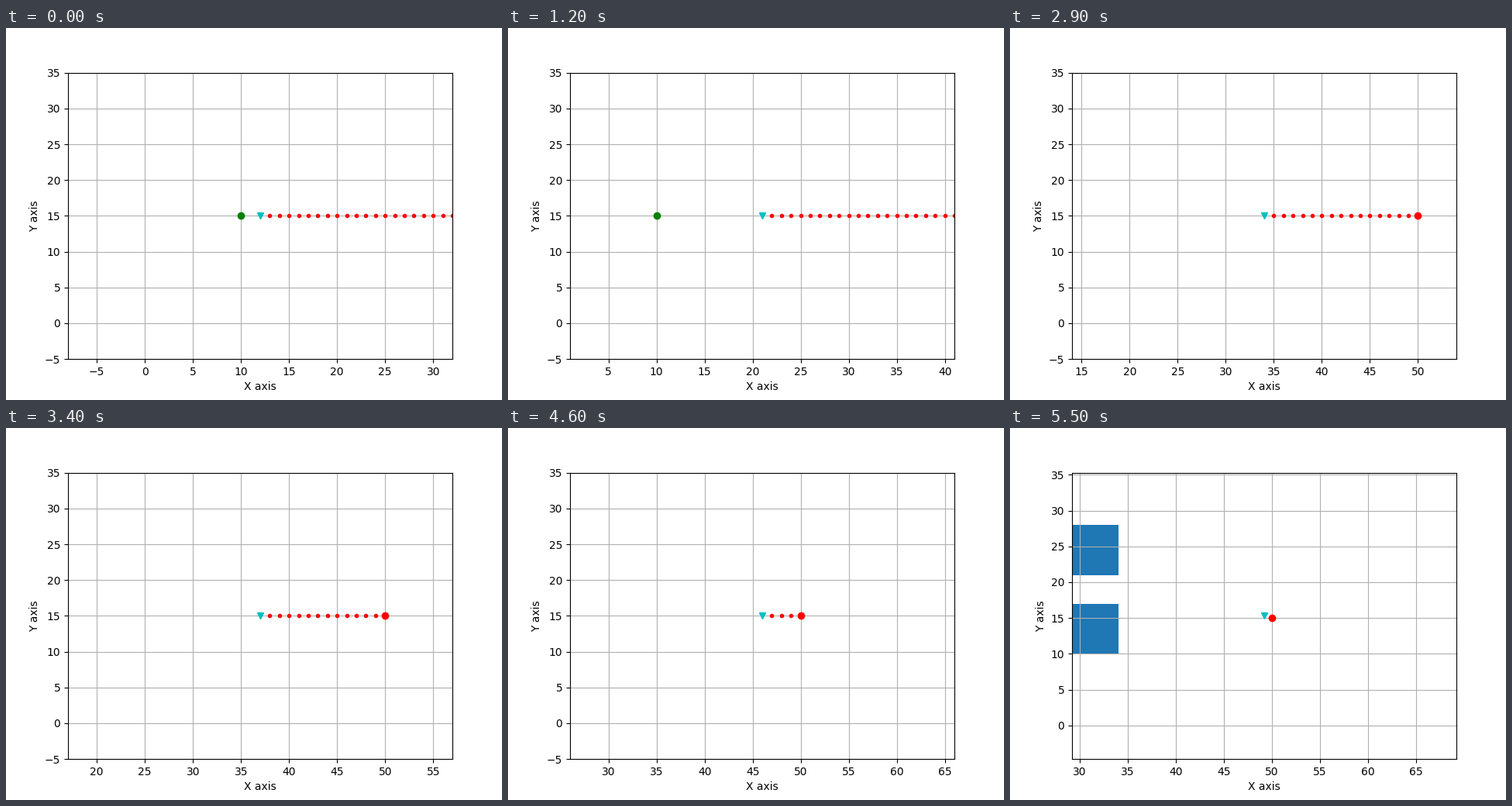
Recreate the animation shown at these times as a matplotlib script. Size 640 by 480 pixels, loop 5600 ms.

```python
import math

import matplotlib.pyplot as plt
from matplotlib.animation import FuncAnimation
from matplotlib.patches import Rectangle

FRAMES = 56
STEP_MS = 100
START, GOAL = 10, 50
LANE = 15
VIEW = 20
ARRIVE = 51             # frame at which the vehicle reaches its goal
PARKED = (49.2, 15.3)
BLOCKS = [(24, 10), (24, 21)]

fig, ax = plt.subplots(figsize=(6.4, 4.8), dpi=100)


def vehicle(i):
    """Vehicle position: whole cells along the lane, then the parking spot."""
    if i >= ARRIVE:
        return PARKED
    if i == 0:
        return 12, LANE
    return math.floor(12.62 + 0.74 * i), LANE


def draw(i):
    ax.clear()
    x, y = vehicle(i)

    if i < ARRIVE:
        path = list(range(x + 1, GOAL))
        ax.plot(path, [LANE] * len(path), ".r")
    else:
        for corner in BLOCKS:
            ax.add_patch(Rectangle(corner, 10, 7, facecolor="C0"))

    ax.plot(START, LANE, "og")
    ax.plot(GOAL, LANE, "or")
    ax.plot(x, y, "vc")

    ax.set_xlim(x - VIEW, x + VIEW)
    ax.set_ylim(y - VIEW, y + VIEW)
    ax.set_xlabel("X axis")
    ax.set_ylabel("Y axis")
    ax.grid(True)
    return []


anim = FuncAnimation(fig, draw, frames=FRAMES, interval=STEP_MS,
                     init_func=lambda: draw(0), repeat=True, repeat_delay=0)
plt.show()
```
